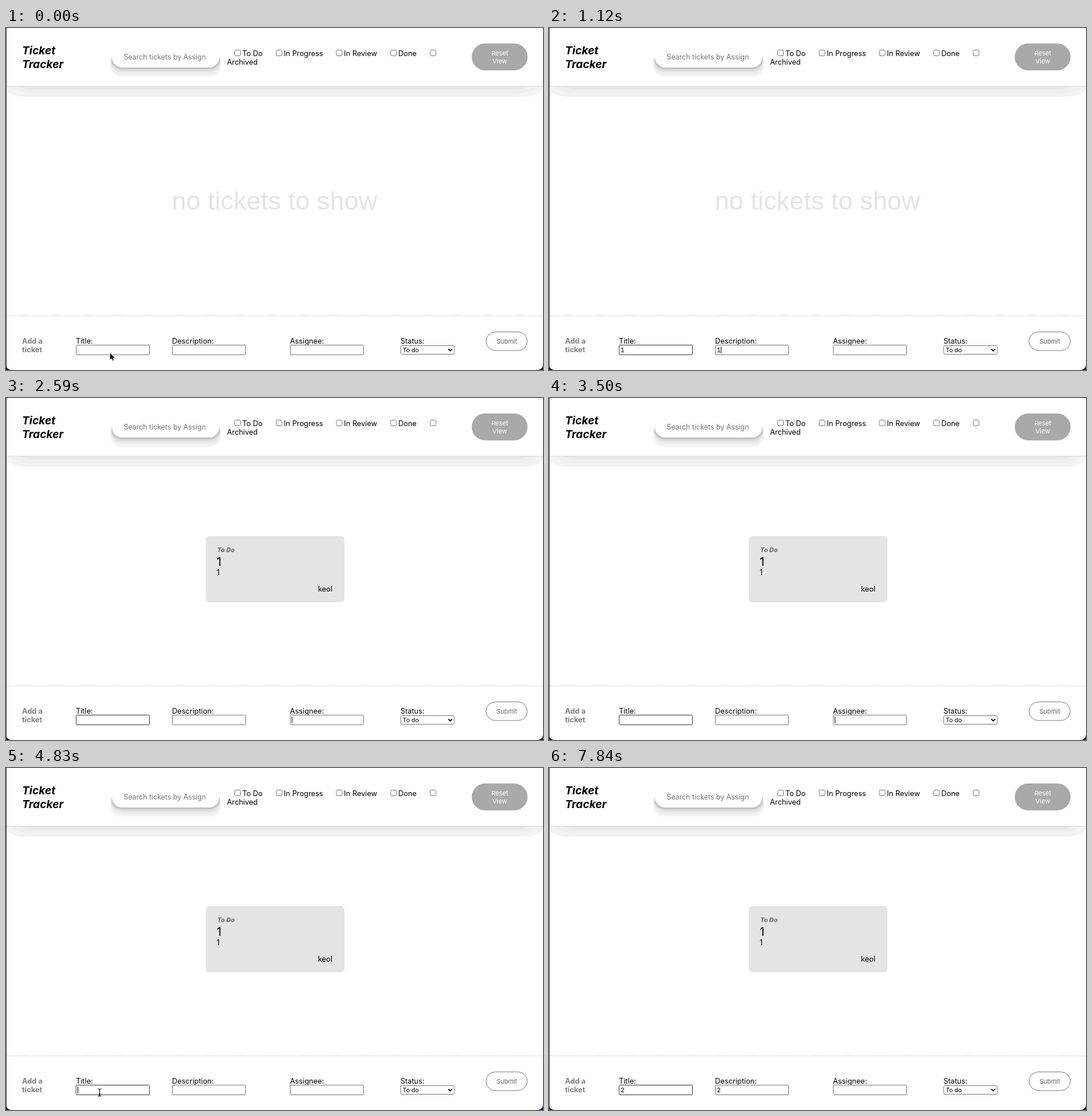
An HTML page for the animation above (8000 ms loop, 938 by 597 pixels).

```html
<!DOCTYPE html>
<html lang="en">
<head>
<meta charset="utf-8">
<title>Ticket Tracker</title>
<style>
html, body { margin: 0; width: 100%; height: 100%; overflow: hidden; background: #fff; }
svg { display: block; width: 938px; height: 597px; font: 12.8px Inter, sans-serif; }
text { white-space: pre; }
.head { font-size: 19.2px; font-weight: 700; font-style: italic; }
.hint { font-size: 12.4px; fill: #757575; }
.big { font: 45.2px "Liberation Sans", sans-serif; fill: #e4e4e4; text-anchor: middle; }
.add { font-weight: 700; fill: #808080; }
.btn { font-size: 11px; text-anchor: middle; }
.val { font-size: 11px; font-variant-numeric: tabular-nums; }
.tag { font-size: 11px; font-weight: 700; font-style: italic; fill: #666; }
.box { fill: #fff; stroke: #767676; }
</style>
</head>
<body>
<svg id="stage" viewBox="0 0 938 597">
  <rect width="938" height="597" fill="#fff"/>
  <g id="shade"></g>
  <rect width="938" height="101" fill="#fff"/>
  <path d="M0 101.5H938" stroke="#dcdcdc"/>
  <g id="glow"></g>
  <rect x="185" y="31" width="187.5" height="38" rx="18" fill="#fff"/>
  <rect x="180" y="30" width="200" height="13" fill="#fff"/>
  <text class="head" x="28" y="46">Ticket</text>
  <text class="head" x="28" y="70">Tracker</text>
  <text class="hint" x="205.5" y="54.5">Search tickets by Assign</text>
  <g id="checks"></g>
  <text x="386" y="64">Archived</text>
  <rect x="813.5" y="27" width="97.5" height="47" rx="23.5" fill="#a9a9a9"/>
  <g class="btn" fill="#fff"><text x="862.5" y="48">Reset</text><text x="862.5" y="61.5">View</text></g>

  <text id="none" class="big" x="469" y="317">no tickets to show</text>
  <g id="card">
    <rect x="349" y="241" width="242" height="115.5" rx="6" fill="#e4e4e4"/>
    <text class="tag" x="369" y="269">To Do</text>
    <text x="368" y="293" font-size="20.5">1</text>
    <text x="368" y="309">1</text>
    <text x="570" y="338" text-anchor="end">keol</text>
  </g>

  <path d="M25 500.5H914" stroke="#efefef" stroke-dasharray="16 38"/>
  <path d="M0 502.5H938" stroke="#e2e2e2"/>
  <text class="add" x="28" y="551">Add a</text>
  <text class="add" x="28" y="566">ticket</text>
  <g id="fields"></g>
  <text x="689" y="551">Status:</text>
  <rect class="box" x="689.5" y="554.5" width="93.5" height="15" rx="2"/>
  <text x="693" y="566" font-size="10.6">To do</text>
  <path d="M772.6 560.3l3.4 3.4l3.4-3.4" fill="none" stroke="#000" stroke-width="1.8"/>
  <rect class="box" x="838.5" y="530.5" width="72" height="32.5" rx="16.25"/>
  <text class="btn" x="874.8" y="551" fill="#666">Submit</text>

  <path d="M.5 0V597" stroke="#2a2a2a"/>
  <path d="M0 588Q1 596 9 597H0Z" fill="#1c1c1c"/>
  <path d="M938 588Q937 596 929 597H938Z" fill="#15152e"/>
  <rect id="caret" y="556" width="1" height="12"/>
  <path id="arrow" d="M0 0V12.6L2.9 9.9L4.8 14.2L6.9 13.3L5.1 9.1H9Z" stroke="#fff" stroke-width=".8"/>
  <path id="beam" d="M-3-6.5Q0-6.5 0-4.5Q0-6.5 3-6.5M0-5V5M-3 6.5Q0 6.5 0 4.5Q0 6.5 3 6.5M-1.7 2.5H1.7" fill="none" stroke="#000" stroke-width="1.1"/>
</svg>
<script>
const LOOP = 8000, SUBMIT = 2590;
const $ = id => document.getElementById(id);

function add(parent, tag, attrs, text = "") {
  const el = document.createElementNS("http://www.w3.org/2000/svg", tag);
  for (const k in attrs) el.setAttribute(k, attrs[k]);
  el.textContent = text;
  return $(parent).appendChild(el);
}

// stepped shadows: left inset, bottom edge, colour
[[0, 120, "#f3f3f3"], [7, 113, "#eeeeee"], [16, 107, "#e7e7e7"]].forEach(([x, b, fill]) =>
  add("shade", "rect", { x, y: 60, width: 938 - 2 * x, height: b - 60, rx: 34, ry: 16, fill }));
[[182, 85, "#f4f4f4"], [182.7, 81, "#ededed"], [183.3, 77, "#e2e2e2"],
 [184, 73.5, "#d2d2d2"], [184.6, 71, "#bebebe"]].forEach(([x, b, fill]) =>
  add("glow", "rect", { x, y: 40, width: 2 * (278.8 - x), height: b - 40, rx: 19, fill }));

[[399.5, "To Do"], [472, "In Progress"], [577, "In Review"], [672, "Done"], [741, ""]].forEach(([x, label]) => {
  add("checks", "rect", { class: "box", x, y: 38.5, width: 10, height: 10, rx: 2 });
  add("checks", "text", { x: x + 13.3, y: 49 }, label);
});

const fields = [[122, "Title:"], [290, "Description:"], [496, "Assignee:"]].map(([x, label]) => {
  add("fields", "text", { x, y: 551 }, label);
  const box = add("fields", "rect", { class: "box", x: x + .5, y: 553.5, width: 128, height: 17, rx: 1 });
  return { x: x + 3, box, val: add("fields", "text", { class: "val", x: x + 3, y: 566 }) };
});

// [time, value] steps for each field
const typed = [
  [[0, ""], [560, "1"], [SUBMIT, ""], [6160, "2"]],
  [[0, ""], [1120, "1"], [SUBMIT, ""], [6860, "2"]],
  [[0, ""], [1750, "k"], [1960, "ke"], [2170, "keo"], [2380, "keol"], [SUBMIT, ""]]
];
// field holding a visible caret, -1 for none
const carets = [[0, -1], [350, 0], [840, 1], [1470, 2], [3010, -1], [3500, 2], [4130, -1],
  [4550, 0], [5110, -1], [5670, 0], [6510, 1], [7210, 2], [7770, -1]];
// pointer path: time, x, y
const moves = [[140, 181.5, 567], [350, 176, 565], [560, 176, 565], [4130, 172, 573],
  [4340, 163.5, 568.5], [4620, 163.5, 568.5], [4830, 163.5, 566.5], [5110, 163.5, 566.5]];

const at = (steps, t) => steps.filter(s => s[0] <= t).pop()[1];

function pointer(t) {
  const i = moves.findIndex(m => m[0] > t);
  if (i === 0) return moves[0].slice(1);
  if (i < 0) return moves[moves.length - 1].slice(1);
  const [a, ax, ay] = moves[i - 1], [b, bx, by] = moves[i];
  const u = (t - a) / (b - a), e = u * u * (3 - 2 * u);
  return [ax + (bx - ax) * e, ay + (by - ay) * e];
}

const show = (el, on) => el.setAttribute("visibility", on ? "visible" : "hidden");

function draw(t) {
  show($("none"), t < SUBMIT);
  show($("card"), t >= SUBMIT);
  fields.forEach((f, i) => {
    const s = at(typed[i], t);
    if (f.val.textContent !== s) f.val.textContent = s;
  });
  fields[0].box.style.stroke = t < 350 ? "#767676" : "#333";

  const n = at(carets, t);
  show($("caret"), n >= 0);
  if (n >= 0) {
    const f = fields[n], w = f.val.textContent ? f.val.getComputedTextLength() : 0;
    $("caret").setAttribute("x", Math.round(f.x + w));
  }

  const [x, y] = pointer(t), early = t < 210;
  show($("arrow"), early);
  show($("beam"), !early && t < 560 || t >= 4130 && t < 6160);
  $(early ? "arrow" : "beam").setAttribute("transform", `translate(${x} ${y})`);
}

const start = performance.now();
function tick() {
  draw((performance.now() - start) % LOOP);
  requestAnimationFrame(tick);
}
tick();
</script>
</body>
</html>
```
